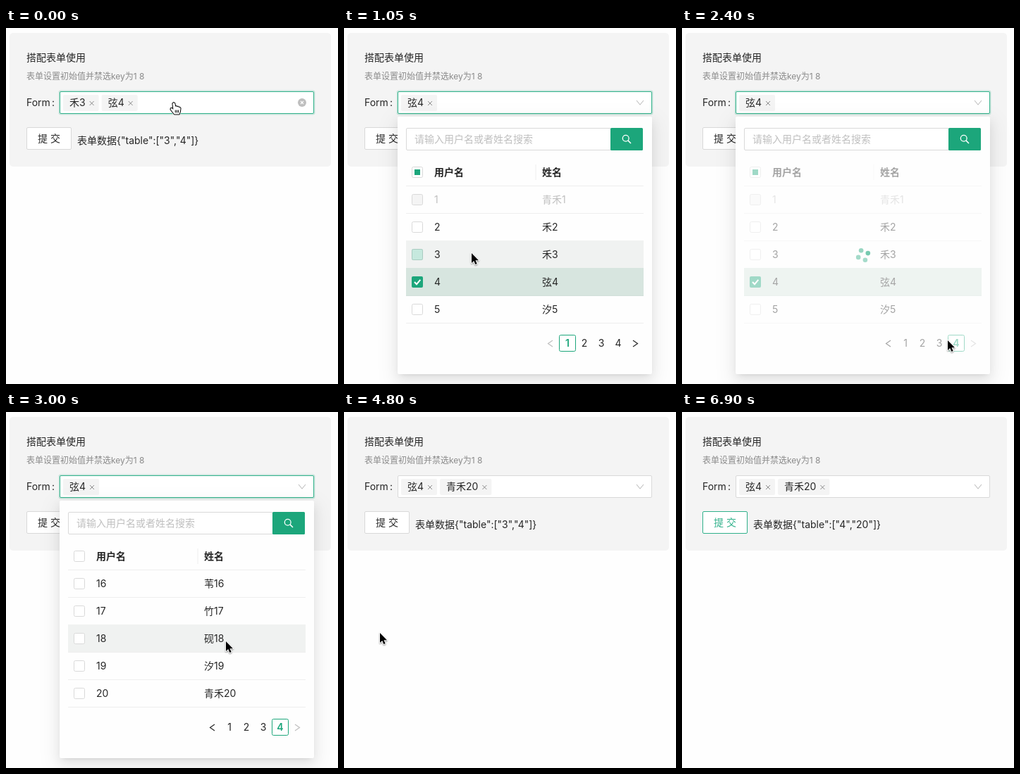
Write an HTML page with a canvas that moves like this. It is 471 by 506 pixels and loops after 7520 ms.

```html
<!DOCTYPE html>
<html lang="zh-CN">
<head>
<meta charset="utf-8">
<title>表单选择</title>
<style>
html, body { margin: 0; width: 100%; height: 100%; overflow: hidden; background: #fefefe; }
canvas { display: block; width: 471px; height: 506px; }
</style>
</head>
<body>
<canvas id="stage"></canvas>
<script>
const W = 471, H = 506, LOOP = 7520, STEP = 150, LAST = 46;
const GREEN = '#1ca67b', INK = '#262626', FAINT = '#bfbfbf', BORDER = '#d9d9d9', LINE = '#eeeeee';
const FONT = 'Inter, "Noto Sans CJK SC", "Noto Sans CJK", sans-serif';
const canvas = document.getElementById('stage');
const ctx = canvas.getContext('2d');
const dpr = window.devicePixelRatio || 1;
canvas.width = W * dpr;
canvas.height = H * dpr;

const FIRST_PAGE = [['1', '青禾1'], ['2', '禾2'], ['3', '禾3'], ['4', '弦4'], ['5', '汐5']];
const LAST_PAGE = [['16', '苇16'], ['17', '竹17'], ['18', '砚18'], ['19', '汐19'], ['20', '青禾20']];

// Step, x, y of the pointer tip
const PATH = [
  [0, 238, 106], [2, 238, 106], [5, 181, 320], [8, 181, 320], [12, 418, 444],
  [14, 386, 446], [16, 377, 444], [20, 312, 326], [24, 312, 397], [27, 312, 397],
  [31, 55, 318], [32, 51, 314], [34, 51, 300], [35, 53, 240], [36, 58, 151],
  [39, 58, 151], [41, 318, 340], [43, 384, 418], [44, 384, 418], [45, 411, 457]
];

function pointerAt(step) {
  const n = PATH.findIndex(p => p[0] >= step);
  if (n < 0) return null;
  if (n === 0) return { x: PATH[0][1], y: PATH[0][2] };
  const [s0, x0, y0] = PATH[n - 1], [s1, x1, y1] = PATH[n];
  const k = (step - s0) / (s1 - s0);
  return { x: x0 + (x1 - x0) * k, y: y0 + (y1 - y0) * k };
}

function text(str, x, y, color = INK, { size = 14, weight = 400, align = 'left' } = {}) {
  ctx.font = `${weight} ${size}px ${FONT}`;
  ctx.textAlign = align;
  ctx.fillStyle = color;
  ctx.fillText(str, x, y + size * 0.36);
}

function box(x, y, w, h, r, fill, stroke) {
  ctx.beginPath();
  if (stroke) ctx.roundRect(x + 0.5, y + 0.5, w - 1, h - 1, r);
  else ctx.roundRect(x, y, w, h, r);
  if (fill) { ctx.fillStyle = fill; ctx.fill(); }
  if (stroke) { ctx.lineWidth = 1; ctx.strokeStyle = stroke; ctx.stroke(); }
}

function lines(points, color, width = 1) {
  ctx.beginPath();
  points.forEach(([x, y], n) => n ? ctx.lineTo(x, y) : ctx.moveTo(x, y));
  ctx.strokeStyle = color;
  ctx.lineWidth = width;
  ctx.stroke();
}

function dot(x, y, r, color) {
  ctx.beginPath();
  ctx.arc(x, y, r, 0, Math.PI * 2);
  ctx.fillStyle = color;
  ctx.fill();
}

function cross(x, y, r, color, width = 1) {
  lines([[x - r, y - r], [x + r, y + r]], color, width);
  lines([[x + r, y - r], [x - r, y + r]], color, width);
}

function withAlpha(alpha, draw) {
  ctx.save();
  ctx.globalAlpha *= alpha;
  draw();
  ctx.restore();
}

function shadow(x, y, w, h, dy, blur, spread, alpha) {
  ctx.save();
  ctx.shadowColor = `rgba(0,0,0,${alpha})`;
  ctx.shadowBlur = blur * dpr;
  ctx.shadowOffsetX = 2000 * dpr;
  ctx.shadowOffsetY = dy * dpr;
  box(x - spread - 2000, y - spread, w + 2 * spread, h + 2 * spread, 2, '#000');
  ctx.restore();
}

function tag(label, x) {
  ctx.font = `400 14px ${FONT}`;
  const w = 28 + ctx.measureText(label).width;
  box(x, 95, w, 23, 2, '#f4f4f4');
  text(label, x + 9, 106);
  cross(x + w - 10, 107, 3, '#8c8c8c');
  return x + w + 4;
}

function form(s) {
  box(5, 7, 456, 190, 5, '#f4f4f4');
  text('搭配表单使用', 29, 42);
  text('表单设置初始值并禁选key为1 8', 29, 68.5, '#8a8a8a', { size: 12 });
  text('Form', 29, 106);
  text(':', 65, 106);

  const focused = s < 32;
  if (focused) box(74.5, 88.5, 364, 35, 3, 'rgba(28,166,123,.2)');
  box(76, 90, 361, 32, 1.5, '#fff', focused ? '#35b38d' : BORDER);
  let x = 81;
  if (s < 7) x = tag('禾3', x);
  x = tag('弦4', x);
  if (s >= 25) tag('青禾20', x);
  if (s < 3) {
    dot(420, 106, 6, FAINT);
    cross(420, 106, 2, '#fff', 1.1);
  } else {
    lines([[415, 103], [420, 109], [425, 103]], FAINT, 1.1);
  }

  const active = s >= 36;
  if (s === 38 || s === 39) {
    withAlpha(s === 38 ? 0.3 : 0.12, () => box(26, 138, 70, 38, 4, GREEN));
  }
  box(29, 141, 64, 32, 1.5, '#fff', active ? '#2fb08a' : BORDER);
  text('提 交', 61, 157, active ? '#2fb08a' : INK, { align: 'center' });
  text('表单数据{"table":[' + (s < 38 ? '"3","4"' : '"4","20"') + ']}', 101, 159.5);
}

function checkbox(y, fill, disabled) {
  box(96, y - 8, 16, 16, 2, disabled ? '#f4f4f4' : '#fff', BORDER);
  if (fill) withAlpha(fill, () => box(96, y - 8, 16, 16, 2, GREEN));
  if (fill > 0.45) lines([[100, y], [103, y + 3.2], [108.3, y - 3.2]], '#fff', 2);
}

function tableRow([user, name], n, fill, hover, disabled) {
  const top = 225 + n * 39, y = 244 + n * 39;
  const picked = fill > 0.4;
  const bg = picked ? (hover ? '#d1e1da' : '#d7e5df') : hover ? '#f0f2f1' : null;
  if (bg) box(88, top - 1, 337, 39, 0, bg);
  ctx.fillStyle = picked ? '#d0dfd8' : LINE;
  ctx.fillRect(88, top + 38, 337, 1);
  const color = disabled ? FAINT : INK;
  checkbox(y, fill, disabled);
  text(user, 128, y, color);
  text(name, 281, y, color);
}

function pager(s, p) {
  const page = s < 15 ? 1 : 4;
  const prev = page === 1 ? FAINT : INK, next = page === 4 ? FAINT : INK;
  lines([[296, 444], [289.5, 448.5], [296, 453]], prev, 1.2);
  lines([[410, 444], [416.5, 448.5], [410, 453]], next, 1.2);
  for (let n = 1; n <= 4; n++) {
    const x = 293 + n * 24, on = n === page;
    const hover = p && s < 32 && p.y > 435 && Math.abs(p.x - x) < 12;
    if (on) box(x - 12, 436, 24, 24, 2, '#fff', GREEN);
    text(String(n), x, 448, on || hover ? GREEN : INK, { align: 'center', weight: on ? 600 : 400 });
  }
}

function spinner(s) {
  const base = -23 + (s - 16) * 45;
  for (let n = 0; n < 4; n++) {
    const a = (base + n * 90) * Math.PI / 180;
    const glow = 0.35 + 0.1 * Math.abs(Math.cos(s * 0.4 + n));
    withAlpha(n ? glow : 0.6, () => dot(257 + 7.4 * Math.cos(a), 323 + 7.4 * Math.sin(a), 3.3, GREEN));
  }
}

function table(s, p) {
  const first = s < 19;
  box(96, 197, 16, 16, 2, '#fff', BORDER);
  if (first || s >= 25) box(100, 201, 8, 8, 0, GREEN);
  text('用户名', 128, 205, INK, { weight: 600 });
  text('姓名', 281, 205, INK, { weight: 600 });
  ctx.fillStyle = LINE;
  ctx.fillRect(271.5, 194, 1, 22);
  ctx.fillRect(88, 224, 337, 1);

  const loading = s >= 15 && s < 19;
  const inside = p && !loading && p.x >= 88 && p.x < 425;
  const hovered = inside ? Math.floor((p.y - 225) / 39) : -1;
  (first ? FIRST_PAGE : LAST_PAGE).forEach((row, n) => {
    let fill = 0;
    if (first && n === 3) fill = 1;
    if (first && n === 2) fill = s < 7 ? 1 : s === 7 ? 0.25 : 0;
    if (!first && n === 4) fill = s < 25 ? 0 : s === 25 ? 0.6 : 1;
    tableRow(row, n, fill, n === hovered, first && n === 0);
  });
  pager(s, p);
  if (loading) {
    withAlpha(s === 15 ? 0.3 : 0.58, () => box(86, 186, 341, 277, 0, '#fff'));
    spinner(s);
  }
}

function panel(s, p) {
  const open = s < 1 || s > 31 ? 0 : s === 1 ? 0.6 : s === 31 ? 0.35 : 1;
  if (!open) return;
  ctx.save();
  ctx.globalAlpha = open;
  ctx.translate(0, 126);
  ctx.scale(1, 0.8 + 0.2 * open);
  ctx.translate(0, -126);
  shadow(76, 126, 361, 366, 9, 28, 8, 0.05);
  shadow(76, 126, 361, 366, 6, 16, 0, 0.08);
  shadow(76, 126, 361, 366, 3, 6, -4, 0.12);
  box(76, 126, 361, 366, 2, '#fefefe');
  box(88, 142, 291, 32, 1.5, '#fff', BORDER);
  text('请输入用户名或者姓名搜索', 100, 158, FAINT);
  box(378, 142, 46, 32, 1.5, GREEN);
  ctx.beginPath();
  ctx.arc(399.7, 156.7, 4.4, 0, Math.PI * 2);
  ctx.strokeStyle = '#fff';
  ctx.lineWidth = 1.3;
  ctx.stroke();
  lines([[402.9, 159.9], [407, 164]], '#fff', 1.5);
  table(s, p);
  ctx.restore();
}

function outline(points, fill, stroke, width) {
  ctx.beginPath();
  points.forEach(([x, y], n) => n ? ctx.lineTo(x, y) : ctx.moveTo(x, y));
  ctx.closePath();
  ctx.lineJoin = 'round';
  ctx.lineWidth = width;
  ctx.strokeStyle = stroke;
  ctx.stroke();
  ctx.fillStyle = fill;
  ctx.fill();
}

const ARROW = [[0, 0], [0, 14], [3.2, 11], [5.4, 16], [7.7, 15], [5.5, 10.2], [10, 10.2]];
const HAND = [[-1.6, 1.2], [0, 0], [1.4, 1.2], [2.3, 5.8], [3.6, 5], [4.8, 6.2], [6, 5.6], [7.3, 7],
  [8.6, 6.7], [9.6, 8.2], [9, 12.5], [7.8, 16.5], [0.8, 16.5], [-2, 13], [-4.6, 9.5], [-4, 8], [-2.4, 8.3], [-0.6, 10]];

function pointer(s, p) {
  if (!p) return;
  const overPager = s < 15 && p.y > 435 && p.x > 281;
  const overButton = s >= 36 && s <= 39;
  ctx.save();
  ctx.translate(p.x, p.y);
  ctx.lineCap = 'round';
  if (s <= 2 || overPager || overButton) {
    outline(HAND, '#fff', '#fff', 3);
    outline(HAND, '#fff', '#000', 2);
    for (const x of [2.3, 4.4, 6.5]) lines([[x, 11], [x, 14]], '#000');
  } else if (s >= 24 && s <= 27) {
    const stem = [[1, -5], [1, 5]], caps = [-6, 6];
    for (const [color, width] of [['#fff', 3], ['#000', 1.1]]) {
      lines(stem, color, width);
      for (const y of caps) lines([[-2, y], [1, y * 0.83], [4, y]], color, width);
    }
  } else {
    ctx.shadowColor = 'rgba(0,0,0,.35)';
    ctx.shadowBlur = 2 * dpr;
    ctx.shadowOffsetY = dpr;
    outline(ARROW, '#fff', '#fff', 2);
    ctx.shadowColor = 'transparent';
    outline(ARROW, '#000', '#fff', 1.6);
  }
  ctx.restore();
}

function frame(now) {
  const s = Math.min(LAST, Math.floor((now % LOOP) / STEP));
  const p = pointerAt(s);
  ctx.setTransform(dpr, 0, 0, dpr, 0, 0);
  ctx.fillStyle = '#fefefe';
  ctx.fillRect(0, 0, W, H);
  form(s);
  panel(s, p);
  pointer(s, p);
}

let start;
function tick(now) {
  start ??= now;
  frame(now - start);
  requestAnimationFrame(tick);
}
frame(0);
requestAnimationFrame(tick);
</script>
</body>
</html>
```
